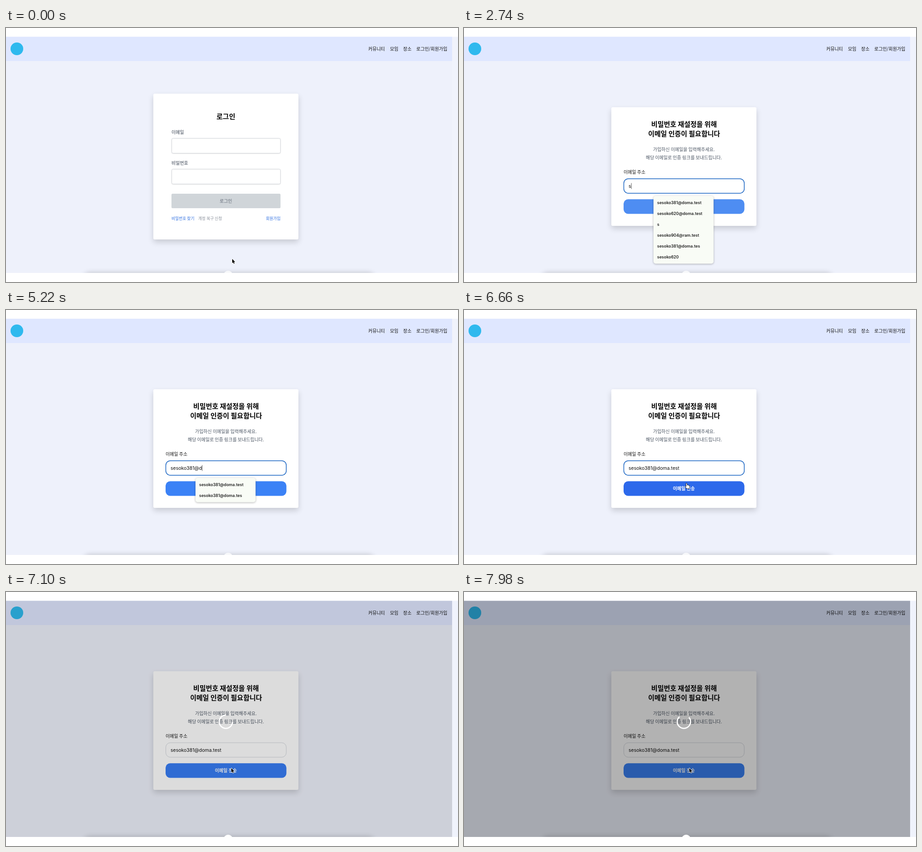
Recreate the animation shown at these times as an HTML page with a canvas. Size 997 px wide and 561 px high, loop 8000 ms.

```html
<!DOCTYPE html>
<html lang="ko">
<head>
<meta charset="utf-8">
<style>
html, body { margin: 0; width: 100%; height: 100%; overflow: hidden; background: #fff; }
canvas { display: block; width: 997px; height: 561px; }
</style>
</head>
<body>
<canvas id="stage" width="997" height="561"></canvas>
<script>
const ctx = document.getElementById('stage').getContext('2d');
const LOOP = 8000;
const FONT = 'Inter, "Noto Sans CJK KR", "Noto Sans CJK", sans-serif';
const KOREAN = '"Noto Sans CJK KR", "Noto Sans CJK", sans-serif';

const EMAIL = 'sesoko381@doma.test';
const KEY_TIMES = [2640, 2880, 3060, 3240, 3400, 3660, 4140, 4460, 4620, 4900, 5220];
const PICK = 5780;        // suggestion chosen
const SWAP = 1500;        // login -> reset page
const FOCUS = 2300;
const HOVER = 6420;       // pointer reaches the button
const LOADING = 6970;

const SUGGESTIONS = ['sesoko381@doma.test', 'sesoko620@doma.test', 's',
  'sesoko904@ram.test', 'sesoko381@doma.tes', 'sesoko620'];
const LONGER = [0, 1, 3, 4, 5].map(i => SUGGESTIONS[i]).concat('sesoko');
const MATCHING = [SUGGESTIONS[0], SUGGESTIONS[4]];

// [time, x, y] pointer stops; eased between
const POINTER = [[0, 499, 510], [640, 499, 510], [1440, 406, 414], [1860, 406, 414],
  [2260, 436, 349], [5220, 436, 352], [5560, 456, 386], [5860, 456, 386],
  [6500, 490, 383], [6700, 490, 383], [6900, 497, 389], [LOOP, 497, 389]];

const clamp = v => Math.max(0, Math.min(1, v));
const ease = v => v * v * (3 - 2 * v);
const progress = (t, start, length) => clamp((t - start) / length);

function mix(a, b, k) {
  return `rgb(${a.map((v, i) => Math.round(v + (b[i] - v) * k)).join()})`;
}

function box(x, y, w, h, r, fill, stroke, width = 1) {
  ctx.beginPath();
  ctx.roundRect(x, y, w, h, r);
  if (fill) { ctx.fillStyle = fill; ctx.fill(); }
  if (stroke) { ctx.strokeStyle = stroke; ctx.lineWidth = width; ctx.stroke(); }
}

function withShadow(color, blur, dy, draw) {
  ctx.save();
  ctx.shadowColor = color;
  ctx.shadowBlur = blur;
  ctx.shadowOffsetY = dy;
  draw();
  ctx.restore();
}

// y is the vertical middle of the glyphs
function label(str, x, y, size, weight, color, align = 'left', family = KOREAN) {
  ctx.font = `${weight} ${size}px ${family}`;
  ctx.textAlign = align;
  ctx.fillStyle = color;
  ctx.fillText(str, x, y + size * 0.37);
}

function card(y, h) {
  withShadow('rgba(0,0,0,.16)', 13, 6, () => box(325, y, 320, h, 3, '#fff'));
}

function page() {
  ctx.fillStyle = '#fff';
  ctx.fillRect(0, 0, 997, 561);
  ctx.fillStyle = '#eef1fb';
  ctx.fillRect(0, 19.5, 984, 521.5);
  ctx.fillStyle = '#f0f3fc';
  ctx.fillRect(984, 19.5, 13, 521.5);
  ctx.fillStyle = '#dfe7ff';
  ctx.fillRect(0, 19.5, 984, 53.5);
  ctx.fillStyle = '#2fb9ee';
  ctx.beginPath();
  ctx.arc(24, 46, 14, 0, Math.PI * 2);
  ctx.fill();
  [['커뮤니티', 799], ['모임', 847], ['장소', 876], ['로그인/회원가입', 905]]
    .forEach(([s, x]) => label(s, x, 46, 10, 500, '#111'));
}

function loginCard() {
  card(145, 322);
  label('로그인', 485, 195, 15, 700, '#000', 'center');
  [['이메일', 230, 243.5], ['비밀번호', 298, 311.5]].forEach(([s, y, top]) => {
    label(s, 365, y, 10, 500, '#374151');
    withShadow('rgba(0,0,0,.08)', 2, 1, () => box(365.5, top, 240, 33, 3, '#fff', '#d5d8dd'));
  });
  box(365, 366, 240.5, 32, 2.5, '#d0d5d9');
  label('로그인', 485, 382, 10, 500, '#636b78', 'center');
  label('비밀번호 찾기', 365, 420.5, 8.8, 400, '#2f6fe0');
  label('계정 복구 신청', 424, 420.5, 8.8, 400, '#8b919c');
  label('회원가입', 605.5, 420.5, 8.8, 400, '#2f6fe0', 'right');
}

function typedText(t) {
  return t >= PICK ? EMAIL : EMAIL.slice(0, KEY_TIMES.filter(k => k <= t).length);
}

function resetCard(t) {
  card(175, 262);
  label('비밀번호 재설정을 위해', 485.5, 212, 15, 700, '#000', 'center');
  label('이메일 인증이 필요합니다', 485.5, 233, 15, 700, '#000', 'center');
  label('가입하신 이메일을 입력해주세요.', 485, 268.5, 10, 400, '#4b5563', 'center');
  label('해당 이메일로 인증 링크를 보내드립니다.', 485, 286, 10, 400, '#4b5563', 'center');
  label('이메일 주소', 352, 318.5, 10, 500, '#111');

  const focused = t >= FOCUS && t < LOADING;
  box(352.5, 332.9, 265.7, 32, 10, '#fff', focused ? '#1763c2' : '#d1d5db', focused ? 1.5 : 1);

  const text = typedText(t);
  label(text, 363, 348.7, 10.5, 400, '#111', 'left', FONT);
  if (focused && t < PICK) {
    const end = 363 + (text ? ctx.measureText(text).width : 0);
    ctx.fillStyle = '#333';
    ctx.fillRect(end + 0.2, 342.5, 0.8, 13);
  }

  const on = ease(progress(t, KEY_TIMES[0], 130));
  const over = ease(progress(t, HOVER, 200)) * (1 - ease(progress(t, LOADING, 180)));
  const fill = on < 1 ? mix([208, 213, 217], [59, 130, 246], on)
    : mix([59, 130, 246], [45, 105, 235], over);
  box(352, 378.3, 266.5, 32.2, 10, fill);
  label('이메일 전송', 485, 394.5, 10, 700, mix([107, 114, 128], [255, 255, 255], on), 'center');
}

function popup(t) {
  if (t < KEY_TIMES[0] + 40 || t >= PICK) return;
  const rows = t < KEY_TIMES[1] ? SUGGESTIONS : t < KEY_TIMES[6] ? LONGER : MATCHING;
  const h = rows.length * 24 + 5.5;
  withShadow('rgba(0,0,0,.3)', 4, 1, () => box(418, 371, 132.5, h, 5, '#f9fcf6'));
  if (t > 5460) box(418, 374, 132.5, 24, 0, '#e6ebe2');
  rows.forEach((s, i) => label(s, 426, 386 + i * 24, 8.9, 600, '#222', 'left', FONT));
}

function dock(t) {
  ctx.save();
  ctx.beginPath();
  ctx.rect(0, 19, 984, 522);
  ctx.clip();
  withShadow('rgba(0,0,0,.22)', 12, 0, () => box(172, 541, 640, 30, 12, '#ccd0d6'));
  ctx.fillStyle = t > LOADING ? '#fff' : '#f7f8fa';
  ctx.beginPath();
  ctx.arc(490, 546, 10, 0, Math.PI * 2);
  ctx.fill();
  if (t > 1360 && t < 1980) {
    ctx.fillStyle = '#d9ead3';
    ctx.fillRect(0, 539, 112, 2);
  }
  ctx.restore();
}

function loader(t) {
  if (t < LOADING) return;
  ctx.fillStyle = `rgba(0,0,0,${0.3 * progress(t, LOADING, 290)})`;
  ctx.fillRect(0, 19.5, 984, 521.5);
  const turn = (t - LOADING) / 1000 * Math.PI * 2;
  ctx.strokeStyle = '#fff';
  ctx.lineWidth = 2.6;
  ctx.beginPath();
  ctx.arc(485, 286.5, 14.7, turn - Math.PI / 4, turn + Math.PI * 1.25);
  ctx.stroke();
}

function shape(points, fill, stroke, width) {
  ctx.beginPath();
  points.forEach(([x, y]) => ctx.lineTo(x, y));
  ctx.closePath();
  ctx.lineJoin = 'round';
  ctx.lineWidth = width;
  ctx.strokeStyle = stroke;
  ctx.stroke();
  ctx.fillStyle = fill;
  ctx.fill();
}

const ARROW = [[0, 0], [0, 9.3], [2.1, 7.4], [3.6, 10.8], [5.1, 10.1], [3.6, 6.9], [6.4, 6.7]];
const HAND = [[0, 0], [1.5, 0], [2, 4], [4, 4], [6.8, 5], [7.2, 7], [6.2, 11.5],
  [1.8, 11.5], [-1.8, 7.4], [-1.2, 6.4], [0.5, 7.2]];

function pointerAt(t) {
  const i = Math.max(1, POINTER.findIndex(p => p[0] > t));
  const [t0, x0, y0] = POINTER[i - 1];
  const [t1, x1, y1] = POINTER[i];
  const k = ease(progress(t, t0, t1 - t0));
  return [x0 + (x1 - x0) * k, y0 + (y1 - y0) * k];
}

function pointer(t) {
  if (t >= KEY_TIMES[0] && t < 5260) return;
  const [x, y] = pointerAt(t);
  const onLink = t < SWAP && x < 416 && y < 427;
  const onButton = t >= HOVER && t < LOADING;
  const onInput = t > SWAP && t < LOADING && y > 333 && y < 365;
  ctx.save();
  ctx.translate(x, y);
  if (onLink || onButton) {
    shape(HAND, '#fff', '#111', 1.6);
  } else if (onInput) {
    ctx.fillStyle = '#222';
    ctx.fillRect(-0.5, -5, 1, 11);
    ctx.fillRect(-2, -5.5, 4, 0.9);
    ctx.fillRect(-2, 5.5, 4, 0.9);
  } else {
    shape(ARROW, '#000', '#fff', 1.5);
  }
  ctx.restore();
}

function frame(now) {
  const t = now % LOOP;
  page();
  if (t < SWAP) loginCard();
  else resetCard(t);
  popup(t);
  loader(t);
  dock(t);
  pointer(t);
  requestAnimationFrame(() => frame(performance.now() - start));
}

const start = performance.now();
frame(0);
</script>
</body>
</html>
```
